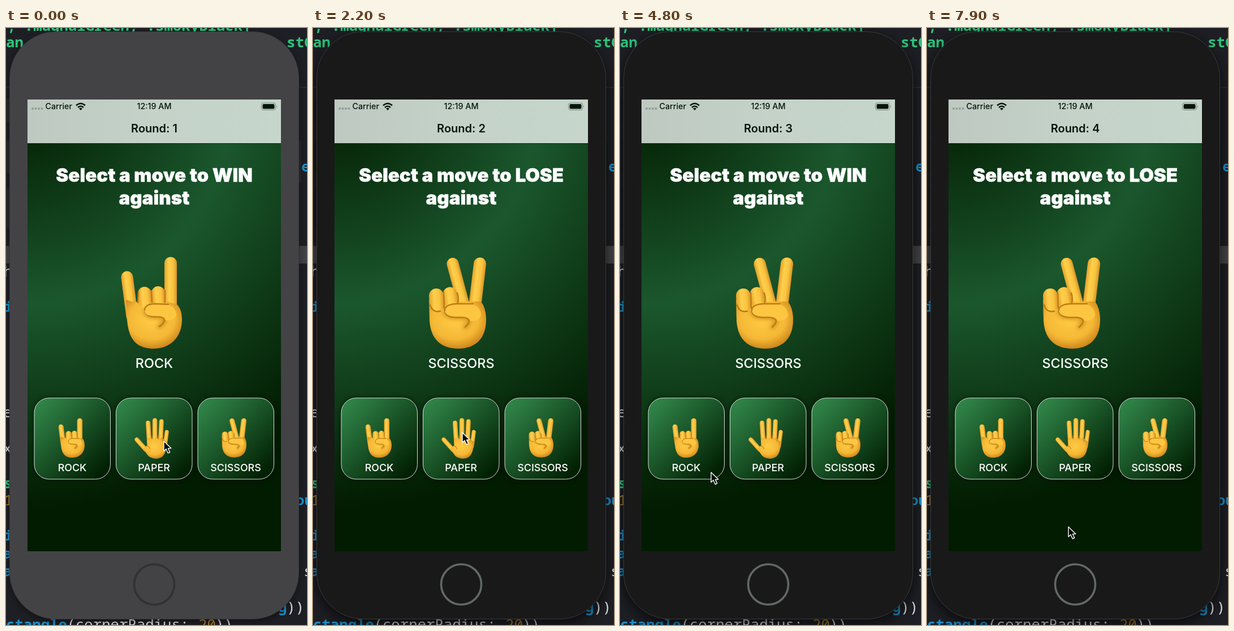
These frames come from a looping animation (532 by 1052 pixels, 8 s). An HTML page:

```html
<!DOCTYPE html>
<html lang="en">
<head>
<meta charset="utf-8">
<title>Rock, paper, scissors</title>
<style>
  html, body { margin: 0; width: 100%; height: 100%; overflow: hidden; background: #1e1f24; }
  svg { display: block; width: 532px; height: 1052px; font-family: Inter, sans-serif; }
  text { white-space: pre; }
  #code { font: 25.7px "Noto Sans Mono", monospace; fill: #dddde0; }
  #code .green { fill: #2cc57c; font-weight: 600; }
  #code .blue { fill: #1d8fc9; font-weight: 600; }
  #code .gold { fill: #a9802f; }
  #phone { --body: #19191a; --edge: #39393a; --home: #626867; --side: #191d1f; }
  #phone.idle { --body: #434346; --edge: #38383a; --home: #313134; --side: #29292b; }
  #shell { fill: var(--body); stroke: var(--edge); filter: drop-shadow(0 8px 12px #000a); }
  #phone.idle #shell { filter: drop-shadow(0 4px 6px #0006); }
  #sides { fill: var(--side); }
  #home { fill: none; stroke: var(--home); stroke-width: 3.6; }
  .mid { text-anchor: middle; }
  .title { font-size: 33.1px; font-weight: 900; stroke: #fff; stroke-width: .5; stroke-linejoin: round; }
  .tile { fill: url(#tileFill); stroke: #d5e3d8; filter: drop-shadow(0 0 4px #0009); }
  .crease, .shade { fill: none; stroke: #bd7b13; stroke-width: 2.4; stroke-linecap: round; }
  .shade { stroke-width: 8; opacity: .6; filter: blur(3px); }
</style>
</head>
<body>
<svg viewBox="0 0 532 1052">
  <defs>
    <radialGradient id="screenFill" gradientUnits="userSpaceOnUse" cx="38" cy="126" r="720">
      <stop stop-color="#021c01"/><stop offset=".5" stop-color="#1b572d"/><stop offset="1" stop-color="#021c01"/>
    </radialGradient>
    <linearGradient id="tileFill" x2=".88" y2=".92">
      <stop stop-color="#338a4c"/><stop offset=".2" stop-color="#2a7840"/><stop offset="1" stop-color="#022003"/>
    </linearGradient>
    <linearGradient id="barFill">
      <stop stop-color="#bec9c1"/><stop offset=".5" stop-color="#c4d2c8"/><stop offset="1" stop-color="#c6d6cb"/>
    </linearGradient>
    <linearGradient id="fingerFill">
      <stop stop-color="#e3a02a"/><stop offset=".35" stop-color="#ffd04c"/>
      <stop offset=".7" stop-color="#fac33f"/><stop offset="1" stop-color="#d8942a"/>
    </linearGradient>
    <radialGradient id="palmFill" cx=".46" cy=".4" r=".63">
      <stop stop-color="#ffcc45"/><stop offset=".65" stop-color="#f5b836"/><stop offset="1" stop-color="#c98018"/>
    </radialGradient>
    <g id="rock"></g><g id="paper"></g><g id="scissors"></g>
  </defs>

  <g id="code">
    <rect y="384" width="532" height="31" fill="#434347"/>
    <rect y="104" width="532" height="1" fill="#333439"/>
  </g>

  <g id="phone">
    <g id="sides">
      <rect x="1" y="124" width="8" height="41" rx="2"/><rect x="1" y="198" width="8" height="58" rx="2"/>
      <rect x="1" y="282" width="8" height="72" rx="2"/><rect x="514" y="198" width="8" height="74" rx="2"/>
    </g>
    <rect id="shell" x="6.5" y="6.5" width="511" height="1035" rx="82"/>
    <circle id="home" cx="262" cy="980.5" r="35.5"/>
  </g>

  <rect x="38" y="126" width="448" height="796" fill="url(#screenFill)"/>
  <rect x="38" y="126" width="448" height="77" fill="url(#barFill)"/>
  <rect x="38" y="203" width="448" height="1" fill="#0b2810"/>
  <g fill="#06150a" font-weight="500" font-size="14.3">
    <g fill="#8f9b93">
      <circle cx="47" cy="142" r="2"/><circle cx="52.5" cy="142" r="2"/><circle cx="58" cy="142" r="2"/><circle cx="63.5" cy="142" r="2"/>
    </g>
    <text x="69.5" y="143">Carrier</text>
    <path d="M124 136.5Q132 129.5 140 136.5M127 140Q132 135.5 137 140" fill="none" stroke="#06150a" stroke-width="2.5"/>
    <path d="M129 142Q132 139.5 135 142L132 145Z"/>
    <text class="mid" x="262" y="143">12:19 AM</text>
    <rect x="451.5" y="132" width="25" height="12.5" rx="3.5" fill="none" stroke="#77877c"/>
    <rect x="453.5" y="134" width="21" height="8.5" rx="2"/>
    <path d="M478 136.5Q480 138.2 478 140Z" fill="#77877c"/>
    <text class="mid" id="round" x="262" y="183.5" font-size="20" font-weight="600"></text>
  </g>

  <g fill="#fff" class="mid">
    <text class="title" id="goal" x="262" y="271"></text>
    <text class="title" x="262" y="311">against</text>
    <use id="hand"/>
    <text id="handName" x="262" y="599" font-size="23.4" font-weight="500"></text>
    <g id="tiles" font-size="17.9" font-weight="500"></g>
  </g>

  <g id="ring">
    <circle cx="269" cy="710" r="26" fill="#0003" stroke="#000" stroke-width="4"/>
    <circle cx="269" cy="710" r="26" fill="none" stroke="#dfe5e0" stroke-width="1.4"/>
  </g>
  <path id="cursor" d="M0 0V17.5L4 13.8L7.2 21L10.6 19.5L7.5 12.6H12.8Z" fill="#050805" stroke="#fff" stroke-width="1.4" stroke-linejoin="round"/>
</svg>
<script>
const $ = id => document.getElementById(id);

const codeLines = [
  [2, 5, "green", ", .magnalGreen, .smokyBlack]"], [0, 34, "green", "an"], [496, 34, "green", "stC"],
  [522, 253, "blue", "e"], [-4, 438, "", "h"], [-3, 500, "blue", "i"], [0, 598, "", "."],
  [-5, 686, "", "e"], [-5, 749, "", "x"], [-4, 811, "green", "s"], [-3, 841, "gold", "1"],
  [512, 841, "blue", "ou"], [-3, 903, "blue", "i"], [-5, 935, "blue", "a"], [-5, 966, "blue", "a"],
  [526, 966, "", "s"], [481, 1029, "blue", "g"], [496, 1029, "", "))"], [0, 1060, "blue", "ctangle"],
  [107.5, 1060, "", "(cornerRadius:"], [340, 1060, "gold", "20"], [370, 1060, "", "))"]
];
$("code").innerHTML += codeLines.map(([x, y, kind, s]) =>
  `<text x="${x}" y="${y}" class="${kind}">${s}</text>`).join("");

// A rounded bar between two fingertip centres.
function finger(x1, y1, x2, y2, w) {
  const length = Math.hypot(x2 - x1, y2 - y1);
  const turn = Math.atan2(y2 - y1, x2 - x1) * 180 / Math.PI - 90;
  return `<rect x="${-w / 2}" y="${-w / 2}" width="${w}" height="${length + w}" rx="${w / 2}"
    fill="url(#fingerFill)" transform="translate(${x1} ${y1}) rotate(${turn})"/>`;
}
const palm = d => `<path d="${d}" fill="url(#palmFill)"/>`;
const crease = d => `<path class="crease" d="${d}"/>`;
const fold = d => `<path class="shade" d="${d}"/>` + crease(d);
const thumb = d => `<path d="${d}" fill="#fdc641"/>`;

$("rock").innerHTML =
  finger(11, 36, 20, 105, 21) + finger(88, 11.5, 88, 105, 22) +
  palm("M9 76Q20 80 32 80L78 78L99 84Q108 92 108 111C108 142 87 162 58 162C28 162 14 146 11 112Z") +
  finger(42, 65, 43, 78, 24) + finger(66, 64, 67, 78, 24) +
  crease("M54 60L55 80M31 62L30 81M78 60L78 80") +
  fold("M43 97Q46 106 60 106Q78 105 77 113Q75 119 68 123") +
  thumb("M42 94C42 86 51 84 62 84L84 85Q98 90 98 104Q93 114 79 112Q78 105 66 104.5C52 105 42 104 42 94Z") +
  crease("M42 94C42 86 51 83 62 83L84 84");

$("scissors").innerHTML =
  finger(42, 11.5, 63, 90, 21) + finger(90, 11.5, 80, 95, 22) +
  palm("M0 74Q18 88 50 78L92 78Q101 90 101 110C101 143 82 161 52 161C22 161 3 145 1 112Z") +
  finger(13, 68, 14, 83, 26) + finger(37, 65, 39, 77, 25) +
  crease("M26 62L27 90M50 63Q53 72 51 80M2 84Q6 98 20 95") +
  fold("M28 96Q32 107 52 106Q71 105 71 113Q69 119 64 123") +
  thumb("M28 94C27 86 38 83 50 83L78 83Q92 89 92 103Q87 113 73 112Q71 105 58 104.5C43 105 29 104 28 94Z") +
  crease("M28 94C27 86 38 82 50 82L78 82");

$("paper").innerHTML =
  finger(10, 88, 46, 128, 18) + finger(56, 20, 61, 98, 19) + finger(84, 10, 84, 100, 20) +
  finger(111, 14, 107, 100, 19) + finger(133, 57, 125, 115, 17) +
  palm("M52 82L116 82L133 98C131 127 129 141 118 154C105 170 70 171 54 151L36 126L52 112Z") +
  crease("M72 72L72 86M97 72L97 86M117 85L117 95M50 113Q60 115 64 126");

const moves = {
  rock: { x: 203, y: 403, tileX: 50, iconX: 92.5 },
  paper: { x: 203, y: 403, tileX: 194.5, iconX: 227 },
  scissors: { x: 205, y: 404, tileX: 339, iconX: 381.5 }
};
$("tiles").innerHTML = Object.entries(moves).map(([name, m]) => `<g id="${name}Tile">
  <rect class="tile" x="${m.tileX}" y="652" width="134.5" height="143" rx="26"/>
  <use href="#${name}" transform="translate(${m.iconX} 687.5) scale(.43)"/>
  <text x="${m.tileX + 67}" y="781">${name.toUpperCase()}</text></g>`).join("");

const rounds = [
  { from: 0, goal: "WIN", move: "rock" },
  { from: 600, goal: "LOSE", move: "scissors" },
  { from: 2600, goal: "WIN", move: "scissors" },
  { from: 5700, goal: "LOSE", move: "scissors" }
];
const presses = [
  { tile: "paper", down: 300, up: 600 },
  { tile: "paper", down: 2300, up: 2600 },
  { tile: "rock", down: 5400, up: 5700 }
];
// time, x, y of the pointer tip
const pointer = [
  [0, 279, 728], [300, 269, 709], [600, 269, 709], [1000, 253, 853], [1700, 253, 853],
  [2200, 264, 713], [2900, 264, 713], [3800, 205, 800], [4800, 161, 783], [5300, 125, 722],
  [5800, 125, 722], [6500, 247, 878], [7000, 247, 878], [7900, 250, 879]
];
const clamp = v => Math.max(0, Math.min(1, v));

function pointerAt(t) {
  const i = Math.max(1, pointer.findIndex(p => p[0] >= t));
  const [t0, x0, y0] = pointer[i - 1], [t1, x1, y1] = pointer[i];
  const k = clamp((t - t0) / (t1 - t0)), ease = k * k * (3 - 2 * k);
  return [x0 + (x1 - x0) * ease, y0 + (y1 - y0) * ease];
}

function tileOpacity(name, t) {
  let opacity = 1;
  for (const { tile, down, up } of presses) {
    if (tile !== name || t < down) continue;
    const dim = t < up ? clamp((t - down + 50) / 250) : 1 - clamp((t - up - 50) / 300);
    opacity = Math.min(opacity, 1 - .8 * dim);
  }
  return opacity;
}

function draw() {
  const t = Math.floor(performance.now() % 8000 / 100) * 100;
  const index = rounds.findLastIndex(r => t >= r.from);
  const { goal, move } = rounds[index];
  $("phone").setAttribute("class", t < 300 ? "idle" : "");
  $("round").textContent = "Round: " + (index + 1);
  $("goal").textContent = "Select a move to " + goal;
  $("hand").setAttribute("href", "#" + move);
  $("hand").setAttribute("transform", `translate(${moves[move].x} ${moves[move].y})`);
  $("handName").textContent = move.toUpperCase();
  for (const name in moves) $(name + "Tile").setAttribute("opacity", tileOpacity(name, t));
  $("ring").setAttribute("visibility", t >= 300 && t < 600 ? "visible" : "hidden");
  $("cursor").setAttribute("transform", `translate(${pointerAt(t)})`);
  requestAnimationFrame(draw);
}
draw();
</script>
</body>
</html>
```
